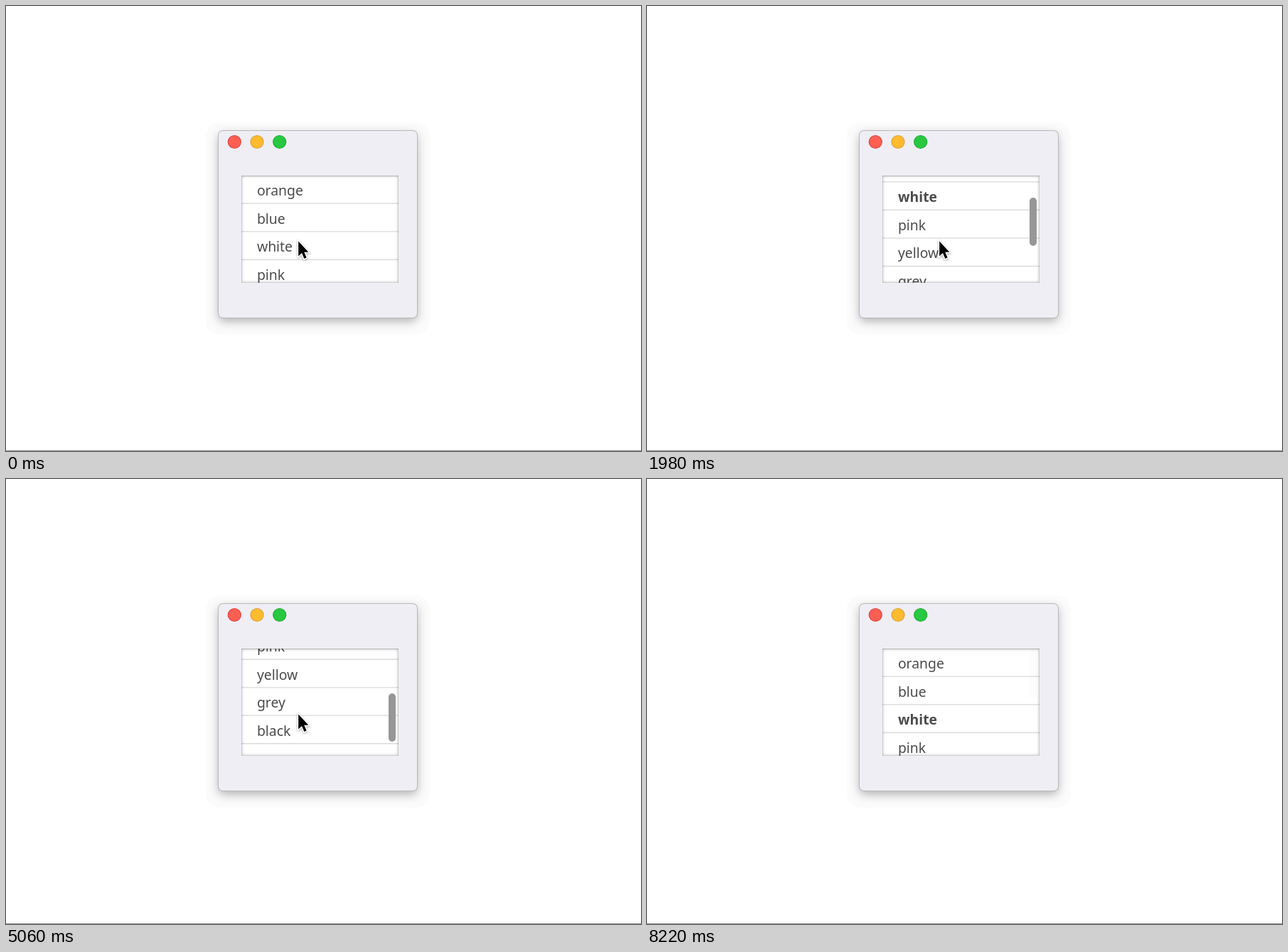
An HTML page that plays this animation: 893x627 px, repeating every 9740 ms.

```html
<!DOCTYPE html>
<html lang="en">
<head>
<meta charset="utf-8">
<title>Color list</title>
<style>
  html, body { margin: 0; width: 100%; height: 100%; overflow: hidden; background: #fff; }
  #stage { position: relative; width: 893px; height: 627px; overflow: hidden; }
  #stage > * { position: absolute; }
  #rule { left: 0; top: 625.5px; width: 893px; height: 1.5px; background: #8c8c8c; }
  #window {
    left: 299px; top: 176px; width: 279px; height: 263px; border-radius: 6px;
    background: #efeef5;
    box-shadow: 0 0 0 1px #b8b8ba, 0 5px 14px rgba(0, 0, 0, .3), 0 6px 0 18px rgba(0, 0, 0, .015);
  }
  #lights { left: 0; top: 0; stroke-width: 1.2; }
  #list { left: 331px; top: 239px; width: 221px; height: 151px; overflow: hidden; background: #fff; }
  #list > * { position: absolute; }
  #rows { left: 0; top: 0; overflow: visible; }
  #rows text { font: 19.4px "Noto Sans", sans-serif; fill: #4c4c4c; }
  #rows line { stroke: #dfdfdf; stroke-width: 1.6; }
  #inset {
    inset: 0;
    box-shadow: inset 0 0 0 1px rgba(0, 0, 0, .09), inset 0 1px 1px rgba(0, 0, 0, .14), inset 0 0 5px rgba(0, 0, 0, .28);
  }
  #thumb { left: 207px; top: 0; width: 10px; height: 68px; border-radius: 5px; background: #979797; }
  #cursor { left: 405px; top: 325px; overflow: visible; filter: drop-shadow(0 1.5px 1.5px rgba(0, 0, 0, .35)); }
</style>
</head>
<body>
<div id="stage">
  <div id="rule"></div>
  <div id="window"></div>
  <svg id="lights" width="893" height="220">
    <circle cx="321.3" cy="191.5" r="9" fill="#ff5f53" stroke="#dc433c"/>
    <circle cx="353" cy="191.5" r="9" fill="#febb2e" stroke="#dda035"/>
    <circle cx="384.7" cy="191.5" r="9" fill="#28c941" stroke="#1dab33"/>
  </svg>
  <div id="list">
    <svg id="rows" width="221" height="320"></svg>
    <div id="inset"></div>
    <div id="thumb"></div>
  </div>
  <svg id="cursor" width="30" height="38">
    <path d="M6.2 6.6V27.4L11 23L14.4 31L17.6 29.6L14.3 21.8H20.4Z"
      fill="#000" stroke="#fff" stroke-width="3" paint-order="stroke"/>
  </svg>
</div>
<script>
const LOOP = 9740, ROW = 39.6;
const names = ["orange", "blue", "white", "pink", "yellow", "grey", "black", "orange"];
const $ = id => document.getElementById(id);

function add(tag, attrs, text = "") {
  const el = document.createElementNS("http://www.w3.org/2000/svg", tag);
  for (const key in attrs) el.setAttribute(key, attrs[key]);
  el.textContent = text;
  return $("rows").appendChild(el);
}

const labels = names.map((name, i) => {
  const y = i * ROW;
  add("line", { x1: 0, x2: 221, y1: y + ROW - 0.4, y2: y + ROW - 0.4 });
  return add("text", { x: 21.9, y: y + 28 }, name);
});

// steps: [time, value, easing towards the next step]
function play(el, prop, steps, format = v => v) {
  const last = steps[steps.length - 1];
  const frames = [...steps, [LOOP, last[1]]].map(([time, value, easing = "linear"]) =>
    ({ offset: time / LOOP, [prop]: format(value), easing }));
  el.animate(frames, { duration: LOOP, iterations: Infinity });
}

const hold = "step-end", flick = "ease-in-out";
const scroll = [
  [0, 0], [1010, 0, "ease"],
  [1980, 70], [2310, 70, "ease"],
  [3120, 160], [4880, 160, "ease"],
  [5780, 102.5], [6780, 102.5, flick],
  [7200, 0]
];
play($("rows"), "transform", scroll, v => `translateY(${-v}px)`);
play($("thumb"), "transform", scroll, v => `translateY(${0.2 + v * 0.44}px)`);
play($("thumb"), "opacity", [
  [0, 0, hold], [1020, 1],
  [3660, 1], [4020, 0, hold], [4900, 1],
  [6200, 1], [6480, 0, hold], [7000, 1],
  [7680, 1], [7960, 0.03]
]);
play(labels[2], "fontWeight", [[0, 400, hold], [180, 700]]);
play($("cursor"), "transform", [[0, [0, 0]], [7940, [0, 0], "ease-in"], [8200, [272, -267]]],
  ([x, y]) => `translate(${x}px, ${y}px)`);
play($("cursor"), "opacity", [[0, 1, hold], [8220, 0]]);
</script>
</body>
</html>
```
